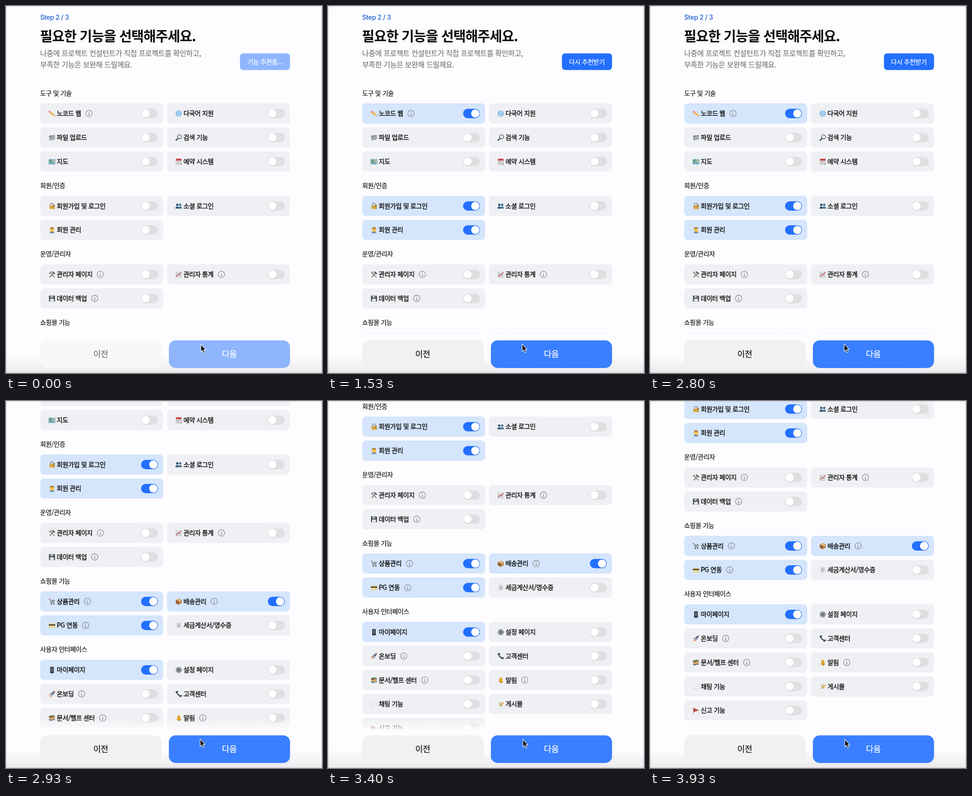
An HTML page that plays this animation: 694x807 px, repeating every 4 s.

```html
<!DOCTYPE html>
<html lang="ko">
<head>
<meta charset="utf-8">
<style>
html, body { margin: 0; width: 100%; height: 100%; overflow: hidden; background: #fdfcff; }
svg { display: block; width: 694px; height: 807px; }
text { font-family: "Noto Sans CJK KR", "Noto Sans CJK", sans-serif; font-size: 14px; letter-spacing: -.38px; fill: #111; }
.step { font-family: Inter, sans-serif; font-size: 14.5px; letter-spacing: -.35px; font-weight: 500; fill: #1d5fcf; }
.head { font-size: 30px; letter-spacing: -1.03px; font-weight: 700; fill: #0c0c0e; }
.desc { font-size: 16px; letter-spacing: -.42px; fill: #626266; }
.group { letter-spacing: -.42px; font-weight: 500; stroke: #111; stroke-width: .22px; }
.label { font-weight: 500; stroke: #111; stroke-width: .42px; }
.mid { text-anchor: middle; font-weight: 500; stroke-width: .25px; }
.big { font-size: 18px; }
.white { fill: #fff; stroke: #fff; }
</style>
</head>
<body>
<svg viewBox="0 0 694 807">
  <defs>
    <linearGradient id="fade" x2="0" y2="1">
      <stop offset="0" stop-color="#fdfcff" stop-opacity="0"/>
      <stop offset="1" stop-color="#fdfcff"/>
    </linearGradient>
    <linearGradient id="shade" x2="0" y2="1">
      <stop offset="0" stop-opacity="0"/>
      <stop offset="1" stop-opacity=".075"/>
    </linearGradient>
  </defs>
  <rect width="694" height="807" fill="#fdfcff"/>
  <g id="page">
    <text class="step" x="75" y="30">Step 2 / 3</text>
    <text class="head" x="74.5" y="77">필요한 기능을 선택해주세요.</text>
    <text class="desc" x="75" y="110">나중에 프로젝트 컨설턴트가 직접 프로젝트를 확인하고,</text>
    <text class="desc" x="75" y="134.5">부족한 기능은 보완해 드릴께요.</text>
    <rect id="ask" x="513.8" y="104.2" width="110" height="36.6" rx="7"/>
    <text id="askText" class="mid white" x="568.6" y="127.5"></text>
  </g>
  <rect y="700" width="694" height="24" fill="url(#fade)"/>
  <rect y="724" width="694" height="83" fill="#fdfcff"/>
  <rect y="768" width="694" height="39" fill="url(#shade)"/>
  <rect id="prev" x="75" y="735.2" width="267" height="60.8" rx="15"/>
  <text id="prevText" class="mid big" x="208" y="771.5">이전</text>
  <rect id="next" x="357.7" y="735.2" width="266.1" height="60.8" rx="15"/>
  <text class="mid big white" x="490.5" y="771.5">다음</text>
  <path d="M.5 807V.5H693.5V807M0 806.5H694" fill="none" stroke="#c4c4c7"/>
  <path id="cursor" d="M0 0V16.2L3.6 12.9L6.2 18.8L8.8 17.7L6.3 11.9H11Z" fill="#0a0a0a" stroke="#fff" stroke-width="1.1" stroke-linejoin="round"/>
</svg>
<script>
const NS = 'http://www.w3.org/2000/svg';
const $ = id => document.getElementById(id);
const page = $('page');

function add(parent, tag, attrs, text) {
  const el = document.createElementNS(NS, tag);
  for (const k in attrs) el.setAttribute(k, attrs[k]);
  if (text) el.textContent = text;
  parent.appendChild(el);
  return el;
}

const fill = (d, c) => `<path d="${d}" fill="${c}"/>`;
const line = (d, c, w = 1) => `<path d="${d}" fill="none" stroke="${c}" stroke-width="${w}" stroke-linecap="round" stroke-linejoin="round"/>`;
const dot = (x, y, r, c) => `<circle cx="${x}" cy="${y}" r="${r}" fill="${c}"/>`;

// Icons live in a 15 x 15 box.
const icons = {
  pencil: line('M3 4L11 10.5', '#f2a93b', 4) + line('M3.6 3.6L11 9.6', '#ffd072', 1.2) + line('M2 3.2L2.6 3.7', '#e58a94', 4) + fill('M10 12.3L12.5 8.8L14.6 13.4Z', '#e9c9a0') + fill('M13 13L14 11.8L14.8 13.6Z', '#333'),
  globe: dot(7.5, 7.5, 6.8, '#62aadb') + line('M1 7.5H14M7.5 1V14M2.5 4Q7.5 6 12.5 4M2.5 11Q7.5 9 12.5 11M7.5 1C3 4 3 11 7.5 14C12 11 12 4 7.5 1', '#e3f3ff', .9),
  folder: fill('M1 4L5 2L6.5 3L13 1.5L14 11L2.5 13.8Z', '#737b83') + fill('M3 5.3L14.3 2.8L13.5 11.2L2.5 13.8Z', '#a2a9b0'),
  lens: line('M1.5 13.5L6 9', '#3b3b3f', 2.4) + `<circle cx="9.3" cy="5.7" r="4.5" fill="#dcebf2" stroke="#48484c" stroke-width="1.3"/>`,
  map: fill('M0 2.5L5 1.5L10 2.5L15 1.5V13L10 14L5 13L0 14Z', '#79b5c8') + fill('M1.5 4L5 3L6.5 6L4 8.5L3 12L1.5 8Z', '#7a9a6a') + fill('M8.5 4L13.5 3.5V8L11 11L9 8Z', '#d6c98c') + line('M5 2V13M10 3V13', '#4c7f98', .8),
  calendar: fill('M1.5 1.5H13.5V14H1.5Z', '#f1f1f3') + line('M1.5 5V14H13.5V5', '#a5a5aa', .9) + fill('M1.5 1H13.5V5.5H1.5Z', '#c64848') + line('M4 8H5M7 8H8M10 8H11M4 11H5M7 11H8', '#555', 1.3) + fill('M9 14L13.5 9.5V14Z', '#9a9aa0'),
  lock: line('M4 7V4.5A3 3 0 0 1 10 4.5V7', '#8c8d92', 1.7) + fill('M2 6.5H11.5V14H2Z', '#e0ad43') + fill('M2 8.5H11.5V9.5H2Z', '#a87722') + dot(12, 6.5, 2.3, '#b98a35') + line('M12 8V14M12 12H13.8', '#a97c2e', 1.4),
  people: dot(4.3, 4.8, 2.6, '#2f5570') + fill('M0 13Q.3 8.5 4.3 8.5T8.3 13Z', '#2f5570') + dot(10.7, 4.8, 2.6, '#47718e') + fill('M6.7 13Q7 8.5 10.7 8.5T14.7 13Z', '#47718e'),
  person: fill('M2.5 14.5Q3 10.5 7.5 10.5T12.5 14.5Z', '#5c87b5') + dot(7.5, 6.5, 4.6, '#f4c04c') + fill('M2.8 6Q3 1 7.5 1T12.2 6L10 4.2H5Z', '#a9762c') + dot(10.5, 11.5, 1.8, '#dfa534'),
  tools: line('M3 13L11.5 3.5', '#8b6b50', 2) + line('M8.5 2L13 5.5', '#55585c', 2.8) + line('M3.5 4L12.5 13', '#7c8085', 1.9) + line('M1.5 4.5L3.8 4.5L4.3 1.8', '#6c7075', 1.7),
  chart: fill('M1 1H14V14H1Z', '#eef1f3') + line('M1.5 1.5V13.5H14M4.5 1.5V13.5M8 1.5V13.5M11.3 1.5V13.5M1.5 5H14M1.5 9H14', '#9fadb6', .8) + line('M2 12L5.5 7.5L8 9L13 2.5', '#d5453d', 1.4),
  floppy: fill('M1 1H12.5L14 2.5V14H1Z', '#383d45') + fill('M4 1.5H11V6H4Z', '#c4c9cf') + fill('M3.2 8H11.8V14H3.2Z', '#e7e9ec') + fill('M8.5 2H10V5.3H8.5Z', '#44495a'),
  cart: line('M1 2H3L5 10.5H12.5', '#73777d', 1.2) + fill('M3.5 3.5H14.5L12.5 9H4.7Z', '#aeb6bf') + line('M4 5.4H13.7M4.5 7.2H13M7 4V9M10.5 4V9', '#6f7780', .6) + line('M1 2H2.5', '#d04a42', 1.5) + dot(6, 12.8, 1.3, '#444') + dot(11.5, 12.8, 1.3, '#444'),
  box: fill('M1 4L7.5 1L14 4V11L7.5 14.5L1 11Z', '#b9824d') + fill('M1 4L7.5 7V14.5L1 11Z', '#946035') + fill('M1 4L7.5 1L14 4L7.5 7Z', '#d4a26b') + line('M4.3 2.5L10.8 5.5V8', '#efd6a5', 1.3),
  card: fill('M.5 3H14.5V12.5H.5Z', '#e6cd78') + fill('M.5 5H14.5V7.5H.5Z', '#36352f') + fill('M2 9H9V10.5H2Z', '#f8f2df'),
  receipt: fill('M2.5 1H13V14L11.2 13L9.5 14L7.8 13L6 14L4.3 13L2.5 14Z', '#dcdde0') + line('M5 3.5H8M5 6H10.5M5 8.3H10.5M5 10.6H8', '#8e8f94', .9),
  phone: `<rect x="3.5" y=".7" width="8" height="13.8" rx="1.5" fill="#2c2c31"/>` + fill('M4.5 2.5H10.5V12H4.5Z', '#535867') + line('M6 5H6.1M9 5H9.1M6 8H6.1M9 8H9.1', '#a0a9b9', 1.3),
  gear: `<circle cx="7.5" cy="7.5" r="5.7" fill="none" stroke="#777b85" stroke-width="2.2" stroke-dasharray="2 1"/>` + dot(7.5, 7.5, 5, '#8b909a') + dot(7.5, 7.5, 2.7, '#4f535d') + dot(7.5, 7.5, 1.1, '#d9dbe0'),
  rocket: fill('M4 7L.8 9L3 10ZM8 11L6.4 14.4L5 12Z', '#c74238') + fill('M14.3 .7Q8 1 3.5 8L7 11.5Q14 7 14.3 .7Z', '#8594a6') + fill('M14.3 .7L10.4 1.8L13.2 4.6Z', '#c74238') + dot(9.8, 5.2, 1.5, '#2f567b') + fill('M3 10L1 14L5 12Z', '#f1a23d'),
  call: line('M3.2 3.5Q4 9.5 11.5 12', '#3e4a54', 2.6) + line('M2.2 3.2L4.5 2.3M10.5 12.8L13 11.5', '#3e4a54', 3.4),
  books: fill('M1 3L9 1L14 3.2L5 5.5Z', '#5f8d4c') + fill('M1 3L5 5.5L14 3.5V6L5.3 8L1 6Z', '#8e3b32') + fill('M2 6.7L5.4 8.5L13.5 6.5V9.5L5.5 11L2 9.3Z', '#d6a044') + fill('M1 9.5L5.3 11.4L14 9.6V12L5.4 14.3L1 12Z', '#42627c') + line('M6 7.2L13.4 5.4M6 13L13.3 11.2', '#eee0c8', .8),
  bell: dot(8.5, 12.7, 1.7, '#a36b18') + fill('M2 11.5Q4 10 4 6.5Q4 2 7.5 1.5Q11 2 11 6.5Q11 10 13.5 11.5Q8 13.7 2 11.5Z', '#dfa22f') + line('M6 4Q5.3 5.3 5.5 8.5', '#f8d67a', 1.2),
  chat: `<ellipse cx="7.5" cy="7" rx="6.8" ry="5.4" fill="#fff" stroke="#b9bdc4" stroke-width=".9"/>` + fill('M3 11L1.8 14L6 12Z', '#d4d6da') + dot(4.5, 7, .8, '#74777d') + dot(7.5, 7, .8, '#74777d') + dot(10.5, 7, .8, '#74777d'),
  memo: fill('M2 2.5L11.5 1.5L13 13L3.5 14Z', '#e9e4d0') + line('M4 5L10 4.3M4.3 7.3L9 6.7M4.7 10L7.5 9.7', '#949084', .8) + line('M13 4.5L7.5 10.5', '#e7a333', 2.2) + fill('M6 12L6.5 9.5L8.4 11Z', '#4b4034'),
  flag: line('M2 1.5V14', '#8d8177', 1.1) + fill('M2.3 2L14.5 7L2.3 11Z', '#bf453e')
};

// Name, icon, flags: i = info mark, on = picked by the recommendation.
const groups = [
  ['도구 및 기술', '노코드 웹|pencil|i on', '다국어 지원|globe', '파일 업로드|folder', '검색 기능|lens', '지도|map', '예약 시스템|calendar'],
  ['회원/인증', '회원가입 및 로그인|lock|on', '소셜 로그인|people', '회원 관리|person|on'],
  ['운영/관리자', '관리자 페이지|tools|i', '관리자 통계|chart|i', '데이터 백업|floppy|i'],
  ['쇼핑몰 기능', '상품관리|cart|i on', '배송관리|box|i on', 'PG 연동|card|i on', '세금계산서/영수증|receipt'],
  ['사용자 인터페이스', '마이페이지|phone|on', '설정 페이지|gear', '온보딩|rocket|i', '고객센터|call', '문서/헬프 센터|books|i', '알림|bell|i', '채팅 기능|chat', '게시물|memo', '신고 기능|flag']
];

const picked = [];

function addCard(x, y, [name, icon, flags = '']) {
  const g = add(page, 'g', { transform: `translate(${x} ${y})` });
  const card = add(g, 'rect', { width: 270, height: 44.4, rx: 8, fill: '#eff0f3' });
  add(g, 'g', { transform: 'translate(18.3 15)' }).innerHTML = icons[icon];
  const label = add(g, 'text', { class: 'label', x: 36.2, y: 27.3 }, name);
  if (flags.includes('i')) {
    const cx = 36.2 + label.getComputedTextLength() + 17.3;
    add(g, 'circle', { cx, cy: 22.3, r: 7, fill: 'none', stroke: '#8b8b90', 'stroke-width': 1.3 });
    add(g, 'path', { d: `M${cx - 1.2} 21.6H${cx + .2}V25.6M${cx - 1.5} 25.7H${cx + 1.7}M${cx} 18.5V19.5`, fill: 'none', stroke: '#8b8b90', 'stroke-width': 1.2 });
  }
  const bar = add(g, 'rect', { x: 221.5, y: 12, width: 37, height: 20.6, rx: 10.3, fill: '#e0dee1' });
  const shadow = add(g, 'circle', { cx: 231.5, cy: 23, r: 9.9, fill: '#000', 'fill-opacity': .08 });
  const knob = add(g, 'circle', { cx: 231.5, cy: 22.3, r: 9.1, fill: '#fff' });
  if (flags.includes('on')) picked.push({ card, bar, shadow, knob });
}

let rowTop = 214.1;
for (const [title, ...items] of groups) {
  add(page, 'text', { class: 'group', x: 75, y: rowTop - 17.5 }, title);
  items.forEach((s, i) => addCard(i % 2 ? 353.6 : 75.2, rowTop + (i >> 1) * 52.8, s.split('|')));
  rowTop += Math.ceil(items.length / 2) * 52.8 + 44.9;
}

const scrollKeys = [[2800, 0], [2870, 150], [2930, 300], [3000, 360], [3130, 372], [3270, 378], [3470, 386], [3600, 406], [3800, 422]];

function valueAt(keys, t) {
  if (t <= keys[0][0]) return keys[0][1];
  for (let i = 1; i < keys.length; i++) {
    const [a, va] = keys[i - 1], [b, vb] = keys[i];
    if (t <= b) return va + (vb - va) * (t - a) / (b - a);
  }
  return keys[keys.length - 1][1];
}

function mix(a, b, p) {
  const part = (c, i) => parseInt(c.slice(1 + 2 * i, 3 + 2 * i), 16);
  return `rgb(${[0, 1, 2].map(i => Math.round(part(a, i) + (part(b, i) - part(a, i)) * p))})`;
}

const paint = (id, a, b, p) => { $(id).style.fill = mix(a, b, p); };

function draw(time) {
  // The screen updates 15 times a second.
  const t = Math.round(Math.floor((time + 4) * .015) * 20 / 3) * 10;
  const u = Math.min(1, Math.max(0, (t - 1270) / 200));
  const p = u * u * (3 - 2 * u);

  page.setAttribute('transform', `translate(0 ${-valueAt(scrollKeys, t)})`);
  for (const { card, bar, shadow, knob } of picked) {
    card.setAttribute('fill', mix('#eff0f3', '#d4e5fc', p));
    bar.setAttribute('fill', mix('#e0dee1', '#236fff', p));
    knob.setAttribute('cx', 231.5 + 16.8 * p);
    shadow.setAttribute('cx', 231.5 + 16.8 * p);
  }
  paint('ask', '#8fb6fd', '#236fff', p);
  paint('prev', '#f7f6f8', '#f1f1f2', p);
  paint('prevText', '#747478', '#141416', p);
  $('prevText').style.stroke = $('prevText').style.fill;
  paint('next', '#8fb5fd', '#3a7fff', p);
  $('askText').textContent = t < 1270 ? '기능 추천중...' : '다시 추천받기';

  const away = t >= 530 && t < 3270;
  $('cursor').setAttribute('transform', away ? 'translate(426.4 743.2)' : 'translate(428 744.2)');
}

function loop() {
  draw(performance.now() % 4000);
  requestAnimationFrame(loop);
}
loop();
</script>
</body>
</html>
```
